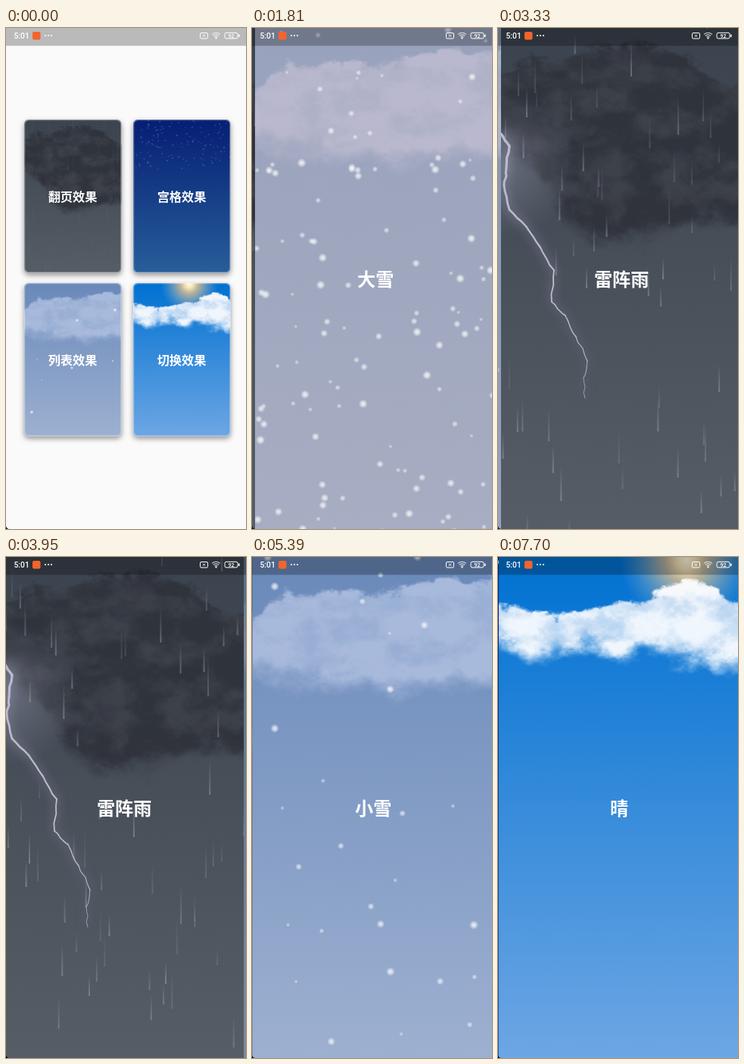
These frames come from a looping animation (317x662 px, 7800 ms). An HTML page with a canvas:

```html
<!DOCTYPE html>
<html lang="zh">
<head>
<meta charset="utf-8">
<style>
  html, body { margin: 0; width: 317px; height: 662px; overflow: hidden; background: #fafafa; }
  canvas, svg { position: absolute; left: 0; top: 0; }
</style>
</head>
<body>
<canvas id="home" width="317" height="662"></canvas>
<canvas id="pages" width="317" height="662"></canvas>
<svg width="317" height="662" fill="none" stroke="#fff">
  <rect width="317" height="23.5" fill="#000" fill-opacity=".26" stroke="none"/>
  <g fill="#fff" stroke="none" font-family="Roboto, sans-serif" font-weight="500">
    <text x="10.5" y="13.8" font-size="10.3">5:01</text>
    <rect x="35" y="5" width="10.5" height="10.5" rx="2" fill="#f4642c"/>
    <circle cx="52" cy="10" r="1.1"/><circle cx="56" cy="10" r="1.1"/><circle cx="60" cy="10" r="1.1"/>
    <text x="297.5" y="12.6" font-size="7" text-anchor="middle">92</text>
    <rect x="307" y="8.5" width="1.5" height="3.5"/>
    <circle cx="277.5" cy="13.6" r="1.1"/>
  </g>
  <rect x="256.5" y="6.5" width="10" height="7.5" rx="1.5"/>
  <path d="M260 8.7l3 3m0-3l-3 3" stroke-width=".9"/>
  <path d="M272 8.4q5.5-4.2 11 0M273.8 10.3q3.7-2.8 7.4 0M275.5 12.1q2-1.5 4 0" stroke-width="1.1" stroke-opacity=".8"/>
  <rect x="289" y="6.3" width="17" height="7.6" rx="2"/>
  <path d="M0 658.5V662H3.5Q.8 661.2 0 658.5Z" fill="#000" stroke="none"/>
</svg>
<script>
const W = 317, H = 662, LOOP = 7800, CARD_SCALE = 0.43;
const home = document.getElementById('home').getContext('2d');
const pages = document.getElementById('pages').getContext('2d');

const clamp = v => Math.max(0, Math.min(1, v));
const mix = (a, b, k) => a + (b - a) * k;
const smooth = v => { v = clamp(v); return v * v * (3 - 2 * v); };

function random(seed) {
  return () => {
    seed = (seed + 0x6D2B79F5) | 0;
    let v = Math.imul(seed ^ (seed >>> 15), 1 | seed);
    v = (v + Math.imul(v ^ (v >>> 7), 61 | v)) ^ v;
    return ((v ^ (v >>> 14)) >>> 0) / 4294967296;
  };
}

function sprite(w, h, paint) {
  const c = document.createElement('canvas');
  c.width = w; c.height = h;
  paint(c.getContext('2d'));
  return c;
}

// Fractal value noise shared by every cloud
const CW = 320, CH = 320;
const rnd = random(7);
const lattice = Array.from({ length: 4096 }, rnd);
const node = (x, y) => lattice[(x & 63) + (y & 63) * 64];
function noise(x, y) {
  const i = Math.floor(x), j = Math.floor(y), u = smooth(x - i), v = smooth(y - j);
  return mix(mix(node(i, j), node(i + 1, j), u), mix(node(i, j + 1), node(i + 1, j + 1), u), v);
}
const field = new Float32Array(CW * CH);
for (let y = 0; y < CH; y++) for (let x = 0; x < CW; x++) {
  let sum = 0, amp = 0.4;
  for (let f = 1 / 38; amp > 0.03; f *= 2, amp *= 0.6) sum += amp * noise(x * f, y * f * 1.25);
  field[y * CW + x] = sum;
}

function outline(points, x) {
  const i = Math.min(points.length - 2, Math.floor(x / 40));
  return mix(points[i], points[i + 1], x / 40 - i);
}

// Shapes hold the upper and lower edge at every 40 px, plus edge softness
const shapes = {
  rain: { top: [58, 42, 32, 27, 23, 25, 42, 64, 66], bottom: [172, 192, 260, 290, 300, 294, 274, 268, 270], soft: [9, 36] },
  snow: { top: [76, 46, 42, 46, 42, 38, 36, 34, 24], bottom: [174, 180, 185, 190, 192, 192, 188, 184, 180], soft: [9, 45] },
  sun: { top: [58, 68, 74, 64, 54, 50, 38, 42, 52], bottom: [118, 146, 144, 130, 140, 136, 146, 150, 148], soft: [8, 32] }
};

function makeCloud({ top, bottom, soft }, dark, light, alpha) {
  return sprite(CW, CH, c => {
    const img = c.createImageData(CW, CH);
    for (let y = 0; y < CH; y++) for (let x = 0; x < CW; x++) {
      const n = field[y * CW + x], wobble = (n - 0.44) * 48, k = y * CW + x << 2;
      const shade = smooth((n - 0.25) * 2.6);
      for (let i = 0; i < 3; i++) img.data[k + i] = mix(dark[i], light[i], shade);
      const a = smooth((y - outline(top, x) + wobble) / soft[0]) * smooth((outline(bottom, x) - y + wobble) / soft[1]);
      img.data[k + 3] = 255 * alpha * a;
    }
    c.putImageData(img, 0, 0);
  });
}

const storm = makeCloud(shapes.rain, [60, 64, 73], [46, 49, 57], 0.9);
const scenes = [
  { name: '大雨', sky: ['#3b434e', '#565d66'], cloud: storm, rain: 60 },
  { name: '大雪', sky: ['#98a2bc', '#a7adc2'], cloud: makeCloud(shapes.snow, [176, 178, 200], [188, 186, 207], 0.92), snow: 120 },
  { name: '中雪', sky: ['#8595ad', '#95a4bf'], cloud: makeCloud(shapes.snow, [160, 171, 193], [176, 186, 206], 0.92), snow: 65 },
  { name: '雷阵雨', sky: ['#3b434e', '#565d66'], cloud: storm, rain: 60, bolt: true },
  { name: '小雨', sky: ['#556e8c', '#7c8b9c'], cloud: makeCloud(shapes.rain, [106, 126, 151], [120, 138, 159], 0.9), rain: 32 },
  { name: '小雪', sky: ['#6989ba', '#9db0d0'], cloud: makeCloud(shapes.snow, [156, 177, 214], [173, 190, 222], 0.92), snow: 30 },
  { name: '晴', sky: ['#061e74', '#275e9a'], stars: 115 },
  { name: '晴', sky: ['#0071d1', '#6da6e4'], cloud: makeCloud(shapes.sun, [196, 219, 243], [253, 253, 255], 0.95), sun: true }
];
scenes.forEach((s, seed) => {
  const r = random(seed * 31 + 5);
  s.parts = Array.from({ length: s.rain || s.snow || s.stars || 0 }, () => ({ x: r(), y: r(), size: r(), phase: r() }));
});

const dot = sprite(32, 32, c => {
  const g = c.createRadialGradient(16, 16, 0, 16, 16, 16);
  g.addColorStop(0, '#fff');
  g.addColorStop(0.35, 'rgba(255,255,255,.85)');
  g.addColorStop(1, 'rgba(255,255,255,0)');
  c.fillStyle = g;
  c.fillRect(0, 0, 32, 32);
});
const streak = sprite(4, 64, c => {
  const g = c.createLinearGradient(0, 0, 0, 64);
  g.addColorStop(0, 'rgba(200,202,210,0)');
  g.addColorStop(1, 'rgba(200,202,210,1)');
  c.fillStyle = g;
  c.fillRect(1, 0, 2, 64);
});

function drawSun(c, x) {
  const g = c.createRadialGradient(x, 4, 0, x, 4, 88);
  g.addColorStop(0, '#fffbe8');
  g.addColorStop(0.14, 'rgba(255,232,180,.95)');
  g.addColorStop(0.32, 'rgba(244,196,136,.75)');
  g.addColorStop(0.6, 'rgba(220,196,160,.4)');
  g.addColorStop(1, 'rgba(150,185,205,0)');
  c.fillStyle = g;
  c.fillRect(x - 90, 0, 180, 95);
}

const boltPath = [[0, 140], [11, 156], [7, 185], [4, 208], [11, 240], [33, 262], [52, 290], [70, 320],
  [67, 362], [85, 380], [99, 408], [114, 440], [109, 462], [111, 489]];
function drawBolt(c, t) {
  const power = Math.max(...[3.32, 4.02].map(at => smooth(1.3 - Math.abs(t - at) / 0.2)));
  if (!power) return;
  const r = random(12);
  c.save();
  c.globalAlpha = power;
  const g = c.createRadialGradient(4, 180, 0, 4, 180, 95);
  g.addColorStop(0, 'rgba(170,172,195,.35)');
  g.addColorStop(1, 'rgba(170,172,195,0)');
  c.fillStyle = g;
  c.fillRect(0, 80, 100, 200);
  c.strokeStyle = '#bdbbcf';
  c.shadowColor = '#a9a9c4';
  c.shadowBlur = 14;
  c.lineCap = 'round';
  let [px, py] = boltPath[0];
  boltPath.slice(1).forEach(([x, y], i) => {
    c.lineWidth = mix(3.4, 0.7, i / 12);
    c.beginPath();
    c.moveTo(px, py);
    for (let k = 1; k <= 4; k++) {
      const j = k < 4 ? 3 : 0;
      c.lineTo(mix(px, x, k / 4) + (r() - 0.5) * j, mix(py, y, k / 4) + (r() - 0.5) * j);
    }
    c.stroke();
    [px, py] = [x, y];
  });
  c.restore();
}

function drawParts(c, s, w, h, t, dim) {
  for (const { x, y, size, phase } of s.parts) {
    if (s.stars) {
      const d = 4.6 + size * 1.8;
      c.globalAlpha = dim * (0.78 + 0.22 * Math.sin(phase * 6.3 + t * (1 + size * 2)));
      c.drawImage(dot, x * w - d / 2, 158 * y ** 1.1 - d / 2, d, d);
    } else if (s.snow) {
      const d = 5 + size * 7.5, fall = (y * (h + 20) + t * (25 + 45 * size)) % (h + 20) - 10;
      c.globalAlpha = 0.45 + 0.35 * size;
      c.drawImage(dot, x * w + 5 * Math.sin(t + phase * 6.3) - d / 2, fall - d / 2, d, d);
    } else {
      const len = 24 + size * 32, fall = (y * (h + 70) + t * (330 + 240 * size)) % (h + 70) - 60;
      c.globalAlpha = dim * (0.14 + 0.26 * phase);
      c.drawImage(streak, x * w, fall, 4, len);
    }
  }
  c.globalAlpha = 1;
}

function label(c, text, x, y, size) {
  c.font = `bold ${size}px "Noto Sans CJK SC", "Noto Sans CJK", sans-serif`;
  c.textAlign = 'center';
  c.fillStyle = '#fff';
  c.fillText(text, x, y + size * 0.38);
}

// Paints one weather scene into a box; the sky fills it, the rest is scaled
function drawScene(c, s, box, t, scale = 1) {
  const [x, y, w, h] = box, card = scale < 1;
  c.save();
  c.beginPath();
  c.roundRect(x, y, w, h, card ? 6 : 0);
  c.clip();
  c.translate(x, y);
  const sky = c.createLinearGradient(0, 0, 0, h);
  s.sky.forEach((color, i) => sky.addColorStop(i, color));
  c.fillStyle = sky;
  c.fillRect(0, 0, w, h);
  c.scale(scale, scale);
  if (s.sun) drawSun(c, card ? 172 : 248);
  if (s.cloud) c.drawImage(s.cloud, 0, 0);
  if (s.bolt) drawBolt(c, t);
  const shown = card && s.snow ? { ...s, parts: s.parts.slice(0, 8) } : s;
  drawParts(c, shown, w / scale, h / scale, t, card ? 0.28 : 1);
  c.restore();
}

function drawHome() {
  const cards = [[24, 121, 0, '翻页效果'], [168, 121, 6, '宫格效果'], [24, 337, 5, '列表效果'], [168, 337, 7, '切换效果']];
  home.fillStyle = '#fafafa';
  home.fillRect(0, 0, W, H);
  for (const [x, y, scene, text] of cards) {
    home.save();
    home.shadowColor = 'rgba(0,0,0,.42)';
    home.shadowBlur = 7;
    home.shadowOffsetY = 3;
    home.fillStyle = '#bbb';
    home.beginPath();
    home.roundRect(x, y, 128.5, 202.5, 6);
    home.fill();
    home.restore();
    drawScene(home, scenes[scene], [x, y, 128.5, 202.5], 0, CARD_SCALE);
    home.strokeStyle = 'rgba(255,255,255,.35)';
    home.lineWidth = 1.5;
    home.beginPath();
    home.roundRect(x + 0.5, y + 0.5, 127.5, 201.5, 6);
    home.stroke();
    label(home, text, x + 64, y + 102, 16.2);
  }
}

// Each swipe settles like a critically damped spring
const swipes = [1.28, 2.04, 2.8, 3.94, 4.72, 6.13, 7.03];
function scrollAt(t) {
  return swipes.reduce((sum, start) => {
    const u = 12 * Math.max(0, t - start);
    return sum + 1 - (1 + u) * Math.exp(-u);
  }, 0);
}

function frame(now) {
  const t = Math.min(now % LOOP, 7700) / 1000;
  const opened = clamp((t - 0.27) / 0.3), rise = 1 - (1 - opened) ** 3;
  const style = pages.canvas.style;
  style.opacity = opened;
  style.transform = `translateY(${(1 - rise) * H / 4}px)`;
  if (opened) {
    const scroll = Math.round(scrollAt(t) * W);
    scenes.forEach((s, i) => {
      const x = i * W - scroll;
      if (Math.abs(x) >= W) return;
      drawScene(pages, s, [x, 0, W, H], t);
      label(pages, s.name, x + 159.2, 332, 24.2);
    });
  }
  requestAnimationFrame(frame);
}

drawHome();
requestAnimationFrame(frame);
</script>
</body>
</html>
```
